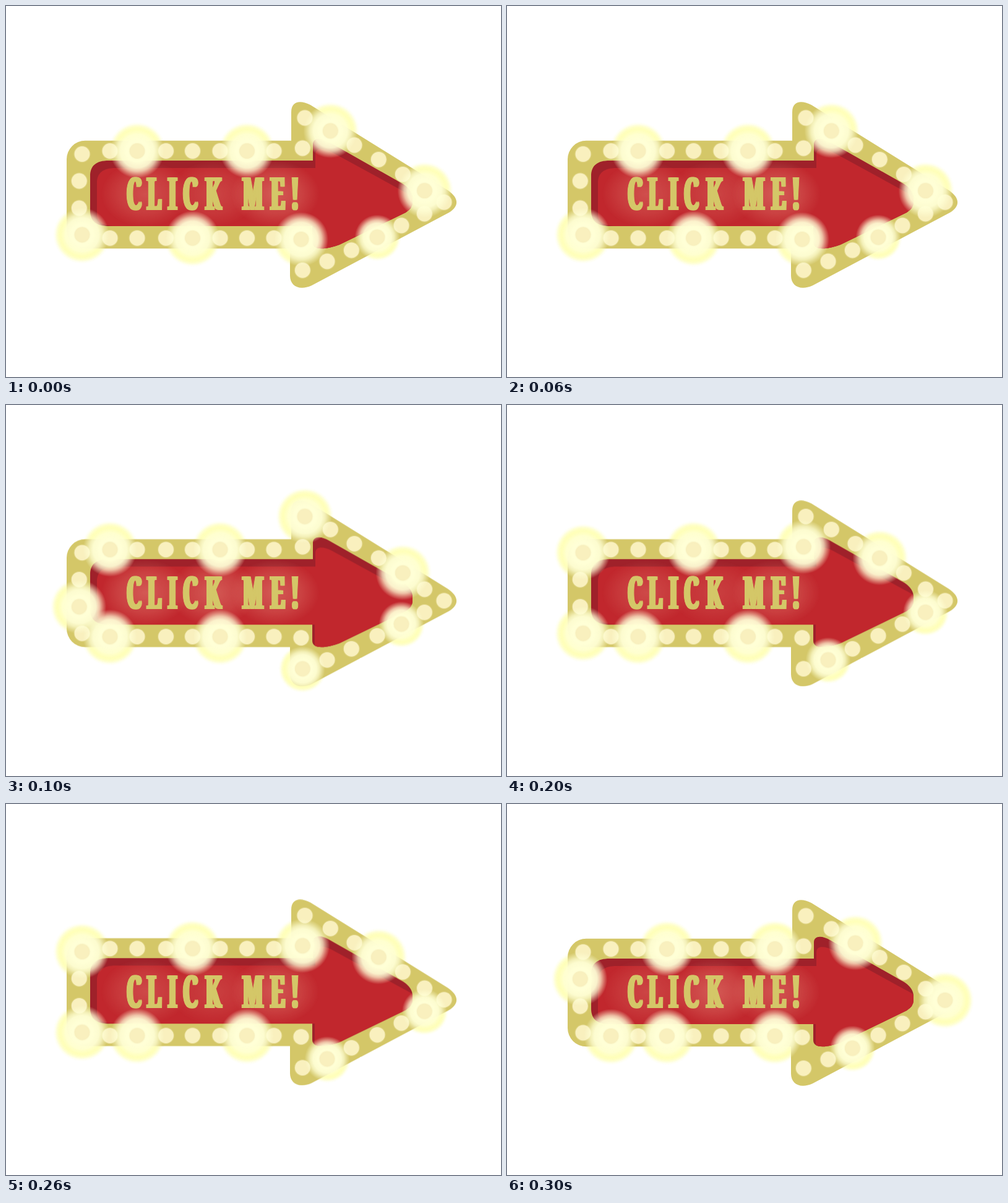
Write an HTML page that moves like this. It is 800 by 600 pixels and loops after 0.4 s.

```html
<!DOCTYPE html>
<html lang="en">
<head>
<meta charset="utf-8">
<title>Marquee arrow</title>
<style>
  html, body { margin: 0; width: 100%; height: 100%; overflow: hidden; background: #fff; }
  svg { display: block; width: 100vw; height: 100vh; }
  .gold { fill: #d4c768; }
  .bulb { fill: #f9f0be; stroke: #f9f0be; stroke-opacity: .25; stroke-width: 2.5; }
  .label { font: 900 71px "Noto Serif", serif; text-anchor: middle; stroke: #d4c768; stroke-width: 2; }
</style>
</head>
<body>
<svg viewBox="0 0 800 600">
  <defs>
    <radialGradient id="halo">
      <stop offset=".6" stop-color="#ffff68"/>
      <stop offset=".72" stop-color="#ffff70" stop-opacity=".85"/>
      <stop offset=".84" stop-color="#ffff80" stop-opacity=".45"/>
      <stop offset=".93" stop-color="#ffff90" stop-opacity=".13"/>
      <stop offset="1" stop-color="#ffff90" stop-opacity="0"/>
    </radialGradient>
    <radialGradient id="glow">
      <stop offset=".4" stop-color="#ffffd6"/>
      <stop offset=".62" stop-color="#ffffd6" stop-opacity=".94"/>
      <stop offset=".75" stop-color="#ffffd6" stop-opacity=".72"/>
      <stop offset=".87" stop-color="#ffffd6" stop-opacity=".36"/>
      <stop offset="1" stop-color="#ffffd6" stop-opacity="0"/>
    </radialGradient>
    <radialGradient id="sheen">
      <stop offset="0" stop-color="#e89080" stop-opacity=".48"/>
      <stop offset=".6" stop-color="#e89080" stop-opacity=".25"/>
      <stop offset="1" stop-color="#e89080" stop-opacity="0"/>
    </radialGradient>
    <path id="panel" d="M136 275C136 258 146 250 166 250H496V224C496 212 510 213 522 220L642 288Q657 298 657 311V318Q657 327 646 334L539 386C520 393 495 397 495 382V356H166C146 356 136 348 136 331Z"/>
    <clipPath id="inside"><use href="#panel"/></clipPath>
  </defs>
  <g id="sign">
    <g id="halos"></g>
    <path class="gold" d="M98 248A30 30 0 0 1 128 217.8H461V172C461 153 476 152 492 160L714 298C733 311 732 324 716 334L494 452C474 461 459 453 459 436V392.3H128A30 30 0 0 1 98 362Z"/>
    <use href="#panel" fill="#9f212a"/>
    <g clip-path="url(#inside)">
      <path fill="#c1272d" d="M147 286C147 270 157 262 177 262H500V240C500 228 514 230 526 236L641 299Q657 307 660 311V340L538 400H499V356H177Q147 356 147 338Z"/>
      <g id="sheens"></g>
    </g>
    <text class="gold label" id="label" transform="scale(.5 1)" y="329.5">CLICK ME!</text>
    <!-- Side copies make the stems heavy and leave the serifs thin. -->
    <use href="#label" x="-1.8"/>
    <use href="#label" x="1.8"/>
    <g id="bulbs"></g>
    <g id="lights"></g>
  </g>
</svg>
<script>
const STEP = 100;
const byId = id => document.getElementById(id);

function add(parent, tag, attrs) {
  const el = document.createElementNS("http://www.w3.org/2000/svg", tag);
  for (const name in attrs) el.setAttribute(name, attrs[name]);
  return byId(parent).appendChild(el);
}

// Holds each value for one step, then loops.
function hold(el, property, values) {
  const frames = [...values, values.at(-1)].map((value, i) =>
    ({ [property]: value, offset: i / values.length, easing: "step-end" }));
  const animation = el.animate(frames, { duration: STEP * values.length, iterations: Infinity });
  animation.startTime = 0;
}

// Each bulb: x, y, the steps in which it is lit, glow size.
const columns = [168, 212, 258.5, 301.5, 346, 389.5, 433];
const topSteps = ["1", "0", "3", "2", "1", "0", "3"];
const bottomSteps = ["13", "2", "3", "0", "1", "2", "3"];
const bulbs = [
  ...columns.map((x, i) => [x, 234.5, topSteps[i]]),
  ...columns.map((x, i) => [x, 375.3, bottomSteps[i]]),
  [123, 239.5, "2"], [118.3, 283, "3"], [118.3, 327, "1"], [123, 370, "02"],
  [477, 377.3, "0"], [479.3, 427.3, "1", .83], [519, 413, "2", .83],
  [558.3, 395, "3", .83], [600, 374, "0", .83], [639, 355, "1", .83],
  [676.3, 336, "2", .83], [708, 317.3, "3"], [676.5, 298.7, "0"],
  [641.3, 272.3, "1"], [602.3, 248.3, "2"], [563, 225, "3"],
  [524.3, 202, "0"], [483, 181, "1"], [479.3, 230, "2"]
];

const litBulbs = [];
for (const [cx, cy, lit, size = 1] of bulbs) {
  const opacity = [0, 1, 2, 3].map(step => lit.includes(step) ? 1 : 0);
  const circle = (parent, r, attrs) => add(parent, "circle", { cx, cy, r, ...attrs });
  circle("bulbs", 12.4, { class: "bulb" });
  hold(circle("halos", 47 * size, { fill: "url(#halo)" }), "opacity", opacity);
  hold(circle("lights", 44 * size, { fill: "url(#glow)" }), "opacity", opacity);
  const litBulb = circle("lights", 12.4, { class: "bulb" });
  hold(litBulb, "opacity", opacity);
  litBulbs.push(litBulb);
}
// Lit bulbs sit above every glow.
byId("lights").append(...litBulbs);

const sheens = [[225, [.8, 1, .7, .6]], [335, [.6, 1, .5, 1]], [435, [1, 1, .9, .9]]];
for (const [cx, opacity] of sheens) {
  const sheen = add("sheens", "ellipse", { cx, cy: 304, rx: 72, ry: 54, fill: "url(#sheen)" });
  hold(sheen, "opacity", opacity);
}

const centers = [207, 239.5, 269, 298, 335, 366, 399, 439, 467];
byId("label").setAttribute("x", centers.map(x => x / .5).join(" "));

const up = "translate(0, -0.7px)", rest = "translate(0, 0)";
hold(byId("sign"), "transform", [rest, up, up, rest]);
</script>
</body>
</html>
```
